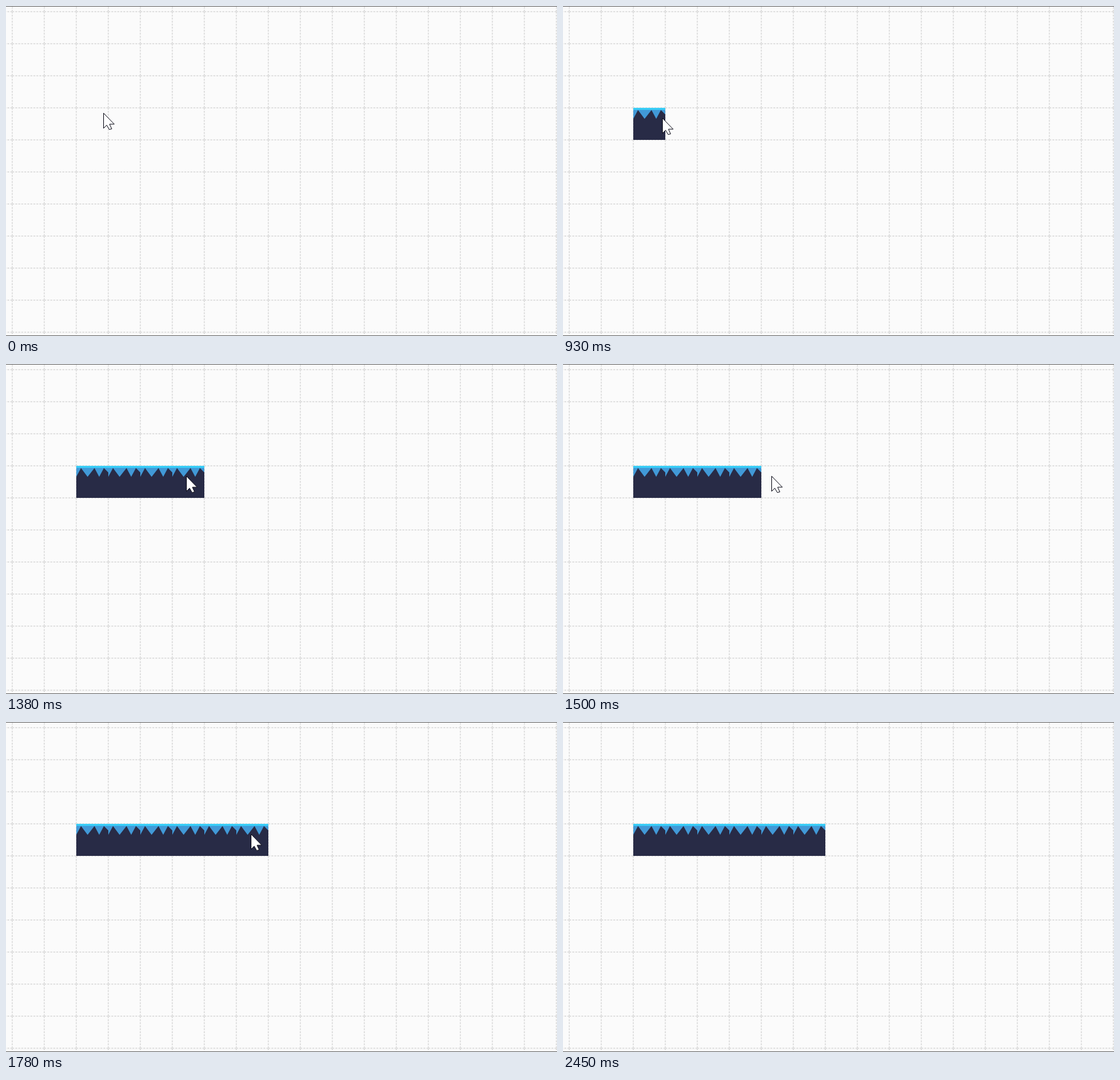
Recreate the animation shown at these times as an HTML page with a canvas. Size 878 by 525 pixels, loop 3580 ms.

```html
<!DOCTYPE html>
<html lang="en">
<head>
<meta charset="utf-8">
<title>Tile painting</title>
<style>
  html, body { margin: 0; width: 100%; height: 100%; overflow: hidden; background: #fbfbfb; }
  canvas { display: block; }
</style>
</head>
<body>
<canvas id="stage" width="878" height="525"></canvas>
<script>
const W = 878, H = 525, LOOP = 3580, CELL = 51;
const LEFT = 10 - CELL, TOP = 9 - CELL;
const ROW_X = 112, ROW_Y = 162;
const PAINT_FROM = 930, EXIT = 2450;
const PAINT_INSET = 18; // how far the pointer enters a cell before it is painted
const ctx = document.getElementById('stage').getContext('2d');

const linear = p => p;
const speedUp = p => p ** 1.38;
const slowDown = p => 1 - (1 - p) ** 3;

// The pointer rests at the end of each stroke until the next one starts.
const strokes = [
  { start: 0, end: 1, from: [155, 170], to: [155, 170], ease: linear },
  { start: 120, end: 121, from: [152, 172], to: [152, 172], ease: linear },
  { start: 280, end: 390, from: [152, 173], to: [152, 178], ease: linear },
  { start: 930, end: 1440, from: [158, 178], to: [311, 178], ease: speedUp },
  { start: 1480, end: 1780, from: [318, 178], to: [390, 178], ease: slowDown },
  { start: 2190, end: 2430, from: [393, 186], to: [704, 490], ease: p => p ** 1.8 }
];

function pointerAt(t) {
  const { start, end, from, to, ease } = strokes.filter(s => s.start <= t).pop();
  const p = ease(Math.min(1, (t - start) / (end - start)));
  return from.map((v, i) => Math.round(v + (to[i] - v) * p));
}

function tileCount(t) {
  if (t < PAINT_FROM) return 0;
  const [x] = pointerAt(Math.min(t, strokes[4].end));
  return Math.ceil((x - PAINT_INSET - ROW_X) / CELL);
}

function rect(color, x, y, w, h) {
  ctx.fillStyle = color;
  ctx.fillRect(x, y, w, h);
}

function polygon(points, x, y) {
  ctx.beginPath();
  points.forEach(([px, py]) => ctx.lineTo(x + px, y + py));
  ctx.closePath();
}

// Every cell side starts and ends with a dash, so dashes meet at the corners.
function drawGrid() {
  rect('#fbfbfb', 0, 0, W, H);
  ctx.save();
  ctx.strokeStyle = '#e1e1e1';
  ctx.lineWidth = 2;
  ctx.setLineDash([3, 1.8]);
  ctx.beginPath();
  for (let x = LEFT; x < W; x += CELL) {
    for (let y = TOP; y < H; y += CELL) {
      ctx.moveTo(x, y);
      ctx.lineTo(x + CELL, y);
      ctx.moveTo(x, y);
      ctx.lineTo(x, y + CELL);
    }
  }
  ctx.stroke();
  ctx.restore();
  rect('#666', 0, 0, W, 1);
  rect('#666', 0, H - 1, W, 1);
}

// Jagged rock: valleys and peaks alternate, the last valley lies past the edge.
const ridge = [0, 7.5, 18, 29, 36.5, 44, 58].map((x, i) => [x, i % 2 ? 3.5 : 17.5]);
const rock = [...ridge, [58, CELL], [0, CELL]];

function drawTile(x, y) {
  ctx.save();
  ctx.beginPath();
  ctx.rect(x, y, CELL, CELL);
  ctx.clip();
  rect('#4199d7', x, y, CELL, 20);
  rect('#3ba8e2', x, y, CELL, 4);
  rect('#39cef7', x, y, CELL, 3);
  polygon(rock, x, y);
  ctx.fillStyle = '#282b46';
  ctx.fill();
  ctx.restore();
}

const arrow = [[0, 0], [0, 24], [5, 19], [9, 26], [13, 25], [9.5, 17.5], [17, 17.5]];

function drawPointer([x, y]) {
  polygon(arrow, x + 0.5, y + 0.5);
  ctx.fillStyle = '#fff';
  ctx.fill();
  ctx.strokeStyle = '#0c0c18';
  ctx.lineWidth = 1;
  ctx.stroke();
}

function draw(t) {
  drawGrid();
  const count = tileCount(t);
  for (let i = 0; i < count; i++) drawTile(ROW_X + i * CELL, ROW_Y);
  if (t < EXIT) drawPointer(pointerAt(t));
}

const begin = performance.now();
function tick() {
  draw(Math.max(0, performance.now() - begin) % LOOP);
  requestAnimationFrame(tick);
}
tick();
</script>
</body>
</html>
```
